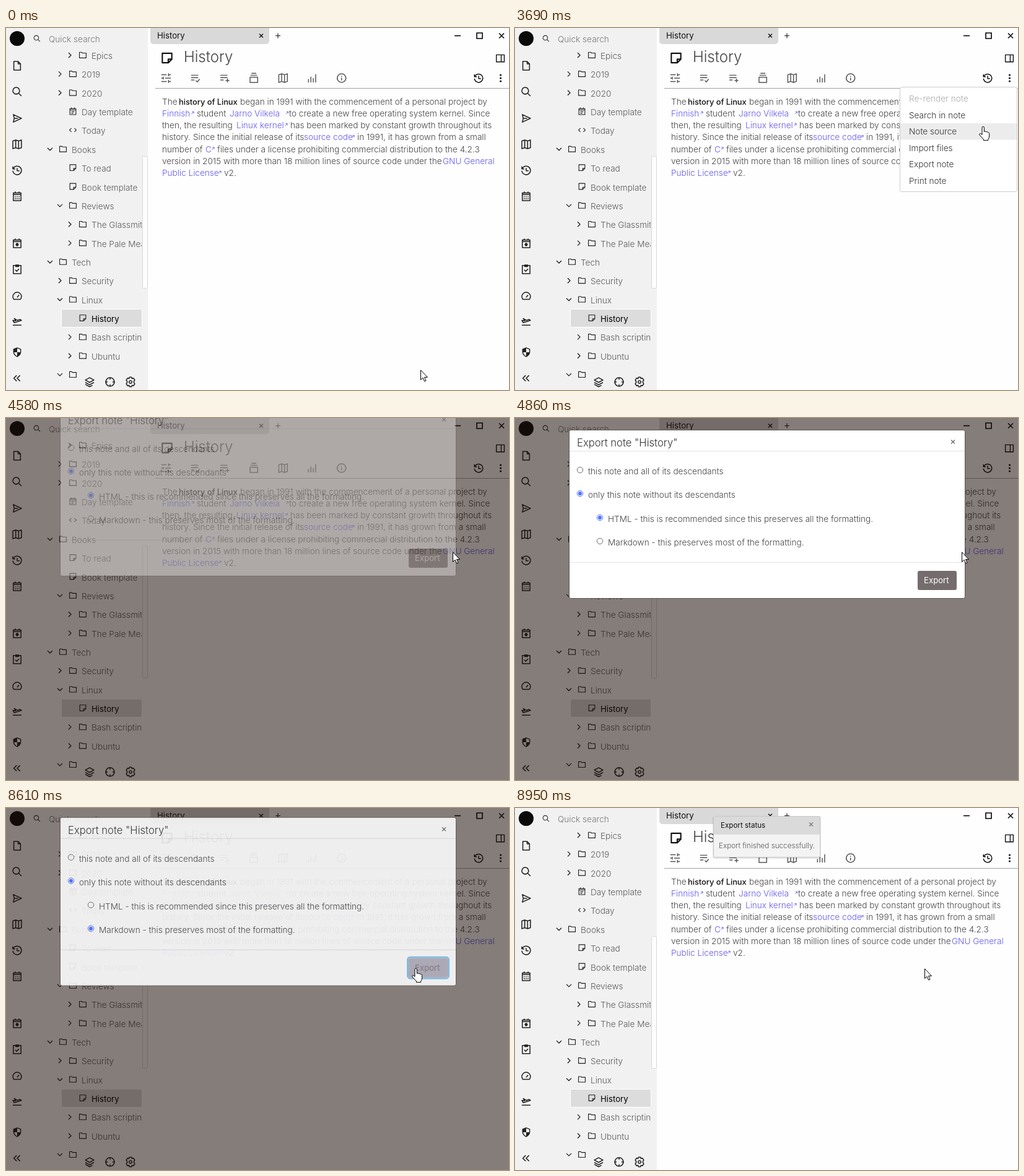
An HTML page that plays this animation: 812x585 px, repeating every 9.17 s.

```html
<!DOCTYPE html>
<html lang="en">
<head>
<meta charset="utf-8">
<title>Export note</title>
<style>
  html, body { margin: 0; width: 100%; height: 100%; overflow: hidden; background: #fff; }
  svg { display: block; font: 300 13.6px Inter, "Open Sans", sans-serif; }
  text { white-space: pre; }
</style>
</head>
<body>
<script>
const LOOP = 9170;
const NS = "http://www.w3.org/2000/svg";
const MEDIUM = { "font-weight": 400, "font-size": 13.2 };

function el(parent, tag, attrs = {}, text) {
  const node = document.createElementNS(NS, tag);
  for (const k in attrs) node.setAttribute(k, attrs[k]);
  if (text !== undefined) node.textContent = text;
  parent.appendChild(node);
  return node;
}
const rect = (p, x, y, width, height, fill, more) => el(p, "rect", { x, y, width, height, fill, ...more });
const label = (p, x, y, s, fill = "#444", more) => el(p, "text", { x, y, fill, ...more }, s);
const stroke = (p, d, color, width = 1, more) =>
  el(p, "path", { d, fill: "none", stroke: color, "stroke-width": width, ...more });
const group = (p, more) => el(p, "g", more);
const cross = (p, x, y, r, color, w = 1.4) =>
  stroke(p, `M${x - r} ${y - r}l${2 * r} ${2 * r}m0 ${-2 * r}l${-2 * r} ${2 * r}`, color, w);

// Icons on a 24 unit grid
const ring = "M12 3a9 9 0 1 0 .01 0";
const sheet = "M4 5h16v16H4zM4 8.5h16M8 2v4M16 2v4";
const ICONS = {
  file: "M5 3h9l5 5v13H5zM14 3v5h5",
  search: "M10 3a7 7 0 1 0 .01 0M15 15l6 6",
  send: "M4 4l17 8-17 8 2-8zM6 12h8",
  map: "M3 5l6-2 6 2 6-2v16l-6 2-6-2-6 2zM9 3v16M15 5v16",
  history: "M4 8a9 9 0 1 1-1 5M3 4v5h5M12 7v6h5",
  calendar: sheet + "M7 13h2M11 13h2M15 13h2M7 17h2M11 17h2M15 17h2",
  star: sheet + "M12 11v7M8.5 14.5h7M10 17l4-5M10 12l4 5",
  day: sheet + "M8 13h8M8 17h5",
  clip: "M4 4h16v17H4zM9 3h6v3H9zM8 13l3 3 5-5",
  gauge: "M5 19a9 9 0 1 1 14 0zM12 15l4-5",
  plane: "M3 20h18M3 10l3 5 15-5-3-2-6 2-6-4 3 5z",
  shield: "M12 2l8 3v6c0 6-4 9-8 11-4-2-8-5-8-11V5z",
  collapse: "M11 6l-6 6 6 6M18 6l-6 6 6 6",
  folder: "M3 5h6l2 2h10v13H3z",
  note: "M4 4h16v10l-6 6H4zM20 14h-6v6",
  code: "M8 7l-5 5 5 5M16 7l5 5-5 5",
  right: "M9 6l6 6-6 6",
  down: "M6 9l6 6 6-6",
  layers: "M12 3l9 5-9 5-9-5zM3 13l9 5 9-5M3 17l9 5 6-3",
  target: ring + "M12 2v5M12 17v5M2 12h5M17 12h5",
  gear: "M12 9a3 3 0 1 0 .01 0M10 2h4l1 3 3-1 3 4-2 3v2l2 3-3 4-3-1-1 3h-4l-1-3-3 1-3-4 2-3v-2l-2-3 3-4 3 1z",
  sliders: "M2 5h11M17 5h5M17 2v6M2 12h4M10 12h12M6 9v6M2 19h11M17 19h5M17 16v6",
  check: "M3 6h15M3 11h15M3 16h7M13 17l3 3 5-6",
  plus: "M3 6h15M3 11h15M3 16h7M18 13v8M14 17h8",
  stack: "M4 10h16v11H4zM5 6h14M7 2h10",
  bars: "M4 14v7M9 9v12M14 12v9M19 4v17",
  info: ring + "M12 11v6M12 7v2",
  panel: "M3 4h18v16H3zM14 4v16"
};
function icon(p, name, x, y, size = 20, color = "#222", w = 2) {
  const k = size / 24;
  return stroke(p, ICONS[name], color, w, {
    transform: `translate(${x - size / 2} ${y - size / 2}) scale(${k})`, "stroke-linejoin": "round"
  });
}

const svg = el(document.body, "svg", { width: 812, height: 585, viewBox: "0 0 812 585" });
const clip = el(el(svg, "defs"), "clipPath", { id: "tree" });
rect(clip, 0, 0, 219, 585);

// Sidebar
rect(svg, 0, 0, 812, 585, "#fefefe");
rect(svg, 0, 0, 229, 585, "#f1f1f1");
const sideFade = rect(svg, 0, 0, 229, 585, "#fefefe");
el(svg, "circle", { cx: 18, cy: 17, r: 12, fill: "#0a0a0a" });
[["file", 61], ["search", 103], ["send", 146], ["map", 188], ["history", 230], ["calendar", 272],
 ["star", 348], ["clip", 390], ["gauge", 433], ["plane", 474], ["shield", 524], ["collapse", 566]]
  .forEach(([name, y]) => icon(svg, name, 18, y, name === "shield" ? 17 : 18.5));
el(svg, "path", { d: "M18 517v7h-6v-5zM18 524h6q-1 5-6 7z", fill: "#222" });
icon(svg, "search", 50, 17, 13, "#333");
label(svg, 69, 23, "Quick search", "#777");

rect(svg, 89.5, 454.5, 130, 29, "#dcdcdc", { rx: 2, stroke: "#fff" });
const tree = group(svg, { "clip-path": "url(#tree)" });
// text, depth, arrow, icon
[["Epics", 2, "right"], ["2019", 1, "right"], ["2020", 1, "right"], ["Day template", 1, "", "day"],
 ["Today", 1, "", "code"], ["Books", 0, "down"], ["To read", 1, "", "note"], ["Book template", 1, "", "note"],
 ["Reviews", 1, "down"], ["The Glassmith", 2, "right"], ["The Pale Meadow", 2, "right"], ["Tech", 0, "down"],
 ["Security", 1, "right"], ["Linux", 1, "down"], ["History", 2, "", "note"], ["Bash scripting", 2, "right"],
 ["Ubuntu", 2, "right"], ["", 1, "down"]]
  .forEach(([name, depth, arrow, kind = "folder"], i) => {
    const y = 45 + i * 30.36, x = 92 + depth * 16, on = name === "History";
    if (arrow) icon(tree, arrow, x - 21, y - 1, 16, "#222");
    icon(tree, kind, x, y - 1.5, 14.5, "#222", 1.9);
    label(tree, x + 14, y + 5, name, on ? "#000" : "#5a5a5a", on ? MEDIUM : {});
  });
rect(svg, 220.5, 207.5, 8, 213, "#fdfdfd", { stroke: "#d8d8d8", rx: 1 });
["layers", "target", "gear"].forEach((n, i) => icon(svg, n, 135 + 33 * i, 572, 18.5));

// Tab bar and note header
rect(svg, 233, -5, 192, 31, "#d9d9d9", { rx: 5 });
label(svg, 244, 17, "History", "#111", MEDIUM);
cross(svg, 412, 12.5, 3, "#111");
stroke(svg, "M435 12.5h8M439 8.5v8", "#222", 1.2);
stroke(svg, "M724 12.5h10", "#000", 1.6);
stroke(svg, "M760 8h9v9h-9z", "#000", 1.6);
cross(svg, 800, 12.5, 4, "#000", 1.5);
icon(svg, "note", 260, 48.5, 23, "#111", 2.2);
label(svg, 287, 55, "History", "#444", { "font-size": 24 });
icon(svg, "panel", 798, 49, 17, "#111", 2);
["sliders", "check", "plus", "stack", "map", "bars", "info"]
  .forEach((n, i) => icon(svg, n, 258.5 + i * 47.2, 81, 18.5, "#555", 1.9));
stroke(svg, "M241 97.5H812", "#a2a2a2");

// Note text: x and string per run, "*" bold, "@" link
const ALIAS = "Jarno Vilkela";
[[252, "The", 279, "*history of Linux", 378, "began in 1991 with the commencement of a personal project by"],
 [252, "@Finnish", 308, "student", 361, "@" + ALIAS, 457, "to create a new free operating system kernel. Since"],
 [252, "then, the resulting", 372, "@Linux kernel", 459, "has been marked by constant growth throughout its"],
 [252, "history. Since the initial release of its", 481, "@source code", 567, "in 1991, it has grown from a small"],
 [252, "number of", 322, "@C", 341, "files under a license prohibiting commercial distribution to the 4.2.3"],
 [252, "version in 2015 with more than 18 million lines of source code under the", 705, "@GNU General"],
 [252, "@Public License", 352, "v2."]]
  .forEach((row, i) => {
    const y = 123.7 + i * 19.2;
    for (let k = 0; k < row.length; k += 2) {
      const mark = row[k + 1][0], link = mark === "@", bold = mark === "*";
      label(svg, row[k], y, row[k + 1].replace(/^[@*]/, ""), link ? "#6459ee" : bold ? "#111" : "#444",
        bold ? { "font-weight": 500, "font-size": 12.8 } : {});
      if (link && k + 2 < row.length) {
        const gap = row[k + 3].startsWith("to ") ? 5 : 8.5;
        stroke(svg, `M${row[k + 2] - gap} ${y - 4}l3.6-3.6m-2.8 0h2.8v2.8`, "#6459ee", .9);
      }
    }
  });

// Header buttons, tooltip, menu
const hoverBox = x => rect(svg, x, 67.5, 27, 27, "#fefefe", { stroke: "#ccc", rx: 3 });
const revHover = hoverBox(748.5);
const dotHover = hoverBox(784.5);
icon(svg, "history", 763, 81, 18, "#111");
[76, 81, 86].forEach(cy => el(svg, "circle", { cx: 798.5, cy, r: 1.6, fill: "#111" }));

const tip = group(svg);
el(tip, "path", { d: "M757 101l5-6 5 6z", fill: "#333" });
rect(tip, 702.5, 101.5, 108, 43, "#fff", { stroke: "#ddd", rx: 3 });
label(tip, 715, 128, "Note Revisions", "#333", { "font-size": 12 });

const menu = group(svg);
const ROW = 26.5, MENU_TOP = 101;
rect(menu, 621.5, 95.5, 189, 169, "#fff", { stroke: "#ccc", rx: 3 });
const menuHover = rect(menu, 622, 0, 188, ROW, "#ececec");
["Re-render note", "Search in note", "Note source", "Import files", "Export note", "Print note"]
  .forEach((s, i) => label(menu, 636, MENU_TOP + i * ROW + 18, s, i ? "#333" : "#aaa"));

// Backdrop and dialog
const shade = rect(svg, 0, 0, 812, 585, "rgb(28,12,4)");
const dialog = group(svg);
rect(dialog, 87.5, 19.5, 639, 272, "#fff", { stroke: "#5d5654", rx: 3 });
label(dialog, 100, 46, "Export note \"History\"", "#333", { "font-size": 16.6 });
cross(dialog, 707, 38.5, 3, "#666", 1.2);
stroke(dialog, "M88 53.5H726M88 233.5H726", "#dfe2e5");
function radio(x, y, s) {
  const edge = el(dialog, "circle", { cx: x, cy: y, r: 4.7, fill: "#fff" });
  const dot = el(dialog, "circle", { cx: x, cy: y, r: 3, fill: "#4a70ff" });
  label(dialog, x + 13, y + 7, s);
  return (on, hover) => {
    edge.setAttribute("stroke", on ? "#4a70ff" : hover ? "#333" : "#6b6b6b");
    dot.setAttribute("opacity", on ? 1 : 0);
  };
}
radio(105, 84, "this note and all of its descendants")(false);
radio(105, 122, "only this note without its descendants")(true);
const html = radio(137, 161, "HTML - this is recommended since this preserves all the formatting.");
const markdown = radio(137, 199, "Markdown - this preserves most of the formatting.");
const focus = rect(dialog, 648.5, 245.5, 66, 34, "#fff", { rx: 4, stroke: "#86c4ee", "stroke-width": 3 });
const button = rect(dialog, 650, 247, 63, 31, "#756c6e", { rx: 3 });
const buttonText = label(dialog, 660, 267, "Export", "#fff", MEDIUM);

// Toast
const toast = group(svg);
rect(toast, 319, 13, 175, 69, "#000", { rx: 3, opacity: .1 });
rect(toast, 320, 13, 173, 67, "#f3f3f3", { rx: 3 });
rect(toast, 320, 13, 173, 30, "#dadada", { rx: 3 });
rect(toast, 320.5, 13.5, 172, 66, "none", { rx: 3, stroke: "#c8c8c8" });
label(toast, 332, 32, "Export status", "#111", { "font-size": 11.6, "font-weight": 400 });
cross(toast, 478, 26.5, 3, "#777", 1.2);
label(toast, 329, 65, "Export finished successfully.", "#555", { "font-size": 11.7 });

// Pointer shapes, hot spot at 0,0
const pointer = group(svg);
const solid = d => el(pointer, "path", { d, fill: "#fff", stroke: "#000", "stroke-width": 1, "stroke-linejoin": "round" });
const shapes = {
  arrow: solid("M.5 .8V16.5L4 13.2L6.6 19L9 18L6.5 12.4H11.5Z"),
  hand: solid("M-1 13V2a1.7 1.7 0 0 1 3.4 0V8.5a1.7 1.7 0 0 1 3 .6a1.7 1.7 0 0 1 2.8 .7a1.6 1.6 0 0 1 2.4 1.4V16q0 3-2 5v1.7H1.5V21L-5 14q-1-2 .8-2.5Q-3 11.5-1 13.5Z"),
  beam: stroke(pointer, "M-3.5-8.5h2.5l1 1 1-1h2.5M0-7.5v15M-3.5 8.5h2.5l1-1 1 1h2.5", "#111", 1)
};

// time, x, y
const PATH = [
  [20, 669, 552], [400, 325, 188], [620, 410, 204], [1360, 410, 204], [1970, 776, 89], [2250, 798, 85],
  [3360, 798, 85], [3970, 721, 216], [5140, 721, 216], [5750, 392, 208], [5900, 392, 208], [6440, 157, 202],
  [6580, 157, 202], [6640, 149, 201], [6710, 157, 194], [7520, 157, 194], [8340, 661, 259]
];
const clamp = v => Math.min(1, Math.max(0, v));
const ramp = (t, from, ms) => clamp((t - from) / ms);
const easeOut = u => 1 - Math.pow(1 - u, 1.75);

function pointerAt(t) {
  let i = PATH.findIndex(k => k[0] > t);
  if (i < 0) i = PATH.length;
  const a = PATH[Math.max(0, i - 1)], b = PATH[Math.min(i, PATH.length - 1)];
  if (a === b) return [a[1], a[2]];
  const u = (t - a[0]) / (b[0] - a[0]), s = u * u * (3 - 2 * u);
  return [a[1] + (b[1] - a[1]) * s, a[2] + (b[2] - a[2]) * s];
}
function shapeAt(t, x, y) {
  if (t >= 2520 && t < 4240) return "hand";
  if (t < 4240) {
    if (y < 96 && x > 748) return "hand";
    return y > 108 && y < 245 ? "beam" : "arrow";
  }
  return t < 8742 && x > 649 && y > 246 ? "hand" : "arrow";
}
const show = (node, v) => node.setAttribute("opacity", v);

function render(t) {
  const [x, y] = pointerAt(t);
  const shape = shapeAt(t, x, y);
  pointer.setAttribute("transform", `translate(${Math.round(x)} ${Math.round(y)})`);
  for (const k in shapes) show(shapes[k], k === shape ? 1 : 0);

  const early = t < 4240;
  show(revHover, early && x > 748 && x < 778 && y < 96 ? 1 : 0);
  show(dotHover, early && x > 784 && y < 96 ? 1 : 0);
  show(tip, ramp(t, 1924, 150) * (1 - ramp(t, 2060, 150)));

  show(menu, t >= 2520 && early ? 1 : 0);
  const row = Math.floor((y - MENU_TOP) / ROW);
  menuHover.setAttribute("y", MENU_TOP + row * ROW);
  show(menuHover, row >= 0 && row < 6 ? 1 : 0);

  const dim = ramp(t, 4380, 150) - ramp(t, 8742, 150);
  show(shade, .53 * dim);
  show(sideFade, clamp(dim * 2 - 1));
  show(dialog, ramp(t, 4530, 150) - ramp(t, 8592, 150));
  const lift = t < 6000 ? 1 - easeOut(ramp(t, 4530, 300)) : easeOut(ramp(t, 8596, 300));
  dialog.setAttribute("transform", `translate(0 ${-50 * lift})`);

  const picked = t >= 6980, pressed = t >= 8540;
  const over = t > 4860 && x > 130 && x < 468 && y > 190 && y < 214;
  html(!picked);
  markdown(picked, over);
  show(focus, pressed ? 1 : 0);
  button.setAttribute("fill", pressed ? "#b2b0be" : "#756c6e");
  buttonText.setAttribute("fill", pressed ? "#7a7480" : "#fff");
  show(toast, ramp(t, 8780, 150));
}

const start = performance.now();
function frame() {
  render((performance.now() - start) % LOOP);
  requestAnimationFrame(frame);
}
frame();
</script>
</body>
</html>
```
